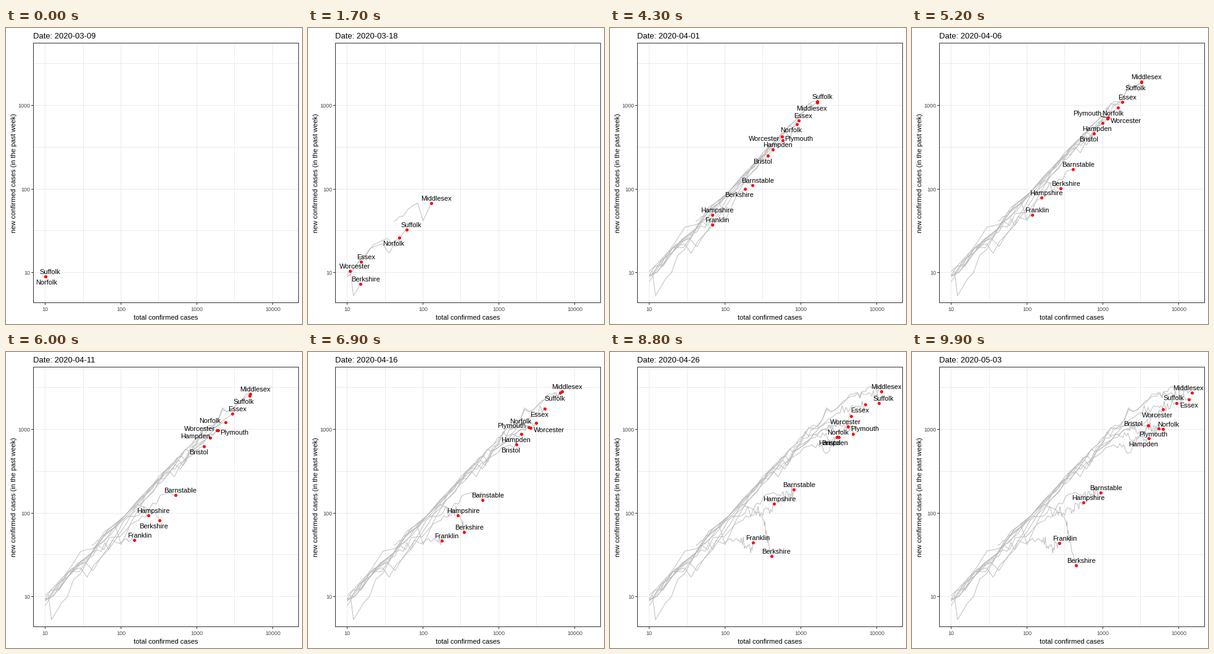
A matplotlib script that plays this animation: 480x480 px, repeating every 10000 ms.

```python
import matplotlib.pyplot as plt
import numpy as np
from matplotlib.animation import FuncAnimation
from matplotlib.patches import Rectangle

SIZE, DPI, FRAMES, LAST_DAY = 480, 80, 100, 55
PT = 72 / DPI
LEFT, TOP, RIGHT, BOTTOM = 44.5, 24.5, 474.5, 445.5
WEEK = 7
# days at which every county has a key point
KEYS = np.array([18.9, 28.9, 33.3, 42.8, 55])

plt.rcParams["font.family"] = "Liberation Sans"
fig = plt.figure(figsize=(SIZE / DPI, SIZE / DPI), dpi=DPI, facecolor="white")
ax = fig.add_axes([0, 0, 1, 1])
ax.set(xlim=(0, SIZE), ylim=(SIZE, 0))
ax.axis("off")


def sx(log_total):
    return 63.6 + 122.85 * (log_total - 1)


def sy(log_new):
    return 396.5 - 135.5 * (log_new - 1)


def crisp(v):
    return np.floor(v) + 0.5


def line(xs, ys, color, z):
    return ax.plot(xs, ys, color=color, lw=PT, zorder=z, snap=False,
                   solid_capstyle="butt")[0]


def text(x, y, s, size, ha="center", color="black", **kw):
    return ax.text(x, y, s, size=size * PT, ha=ha, va="baseline",
                   color=color, zorder=6, **kw)


class County:
    """Total cases ease through three key totals; new cases lag behind them.

    drops: log10(total / new) at the last three key days.
    """

    def __init__(self, name, start, totals, drops, first=10):
        self.start = start
        self.days = np.arange(start, LAST_DAY + 1)
        a, b, c = np.log10(totals)
        late = np.interp(self.days, KEYS,
                         [a, b, b + 0.3 * (c - b), b + 0.65 * (c - b), c])
        u = np.clip((self.days - start) / (KEYS[0] - start), 0, 1)
        a0 = np.log10(first)
        total = np.where(u < 1, a0 + (a - a0) * u ** 1.3, late)

        drop = np.interp(self.days, [start, KEYS[0], *KEYS[2:]],
                         [0.05, 0.08, *drops])
        if start <= WEEK:  # the first reports leave the weekly window
            drop += np.where(self.days > WEEK,
                             0.28 * np.exp((WEEK + 1 - self.days) / 5), 0)
        away = np.abs(self.days[:, None] - KEYS).min(axis=1)
        rng = np.random.default_rng(len(name) + start)
        drop += 0.015 * np.clip(away, 0, 3) * rng.normal(size=self.days.size)

        self.px, self.py = sx(total), sy(total - drop)
        self.half = 2.7 * len(name)
        self.trail = line([], [], "#bebebe", 2)
        self.link = line([], [], "black", 4)
        self.dot, = ax.plot([], [], "o", color="red", ms=5 * PT, mew=0,
                            zorder=5)
        self.label = text(0, 0, name, 11)

    def move(self, day):
        self.x = np.interp(day, self.days, self.px)
        self.y = np.interp(day, self.days, self.py)
        past = self.days < day
        self.trail.set_data(np.r_[self.px[past], self.x],
                            np.r_[self.py[past], self.y])
        self.dot.set_data([self.x], [self.y])

    def spots(self):
        """Places for the label, the best first."""
        side = self.half + 6
        for dx, dy in ((8, -8), (-9, 9), (-side, -3), (side, 3), (-9, -8),
                       (9, 9), (-side - 6, -7), (side + 6, 7)):
            x = np.clip(self.x + dx, LEFT + self.half + 2,
                        RIGHT - self.half - 2)
            yield x, self.y + dy

    def put_label(self, shown, placed):
        def clashes(spot):
            x, y = spot
            dots = sum(abs(c.x - x) < self.half + 2 and abs(c.y - y) < 7
                       for c in shown)
            labels = sum(abs(px - x) < self.half + w and abs(py - y) < 10
                         for px, py, w in placed)
            return dots + 2 * labels

        x, y = min(self.spots(), key=clashes)
        placed.append((x, y, self.half))
        self.label.set_position((x, y + 4))
        ex = np.clip(self.x, x - self.half, x + self.half)
        ey = np.clip(self.y, y - 5, y + 5)
        far = ex != self.x and np.hypot(self.x - ex, self.y - ey) > 6.5
        self.link.set_data([ex, self.x] if far else [],
                           [ey, self.y] if far else [])

    def show(self, on):
        for artist in (self.trail, self.link, self.dot, self.label):
            artist.set_visible(on)


# panel and axes
for v in np.arange(1, 4.1, 0.5):
    line([crisp(sx(v))] * 2, [TOP, BOTTOM], "#ebebeb", 1)
for v in np.arange(1, 3.6, 0.5):
    line([LEFT, RIGHT], [crisp(sy(v))] * 2, "#ebebeb", 1)
for v in range(1, 5):
    x = crisp(sx(v))
    line([x, x], [BOTTOM, 449], "#333333", 1)
    text(x, 459, str(10 ** v), 9, color="#4d4d4d")
for v in range(1, 4):
    y = crisp(sy(v))
    line([41, LEFT], [y, y], "#333333", 1)
    text(39.5, y + 3.5, str(10 ** v), 9, ha="right", color="#4d4d4d")
ax.add_patch(Rectangle((LEFT, TOP), RIGHT - LEFT, BOTTOM - TOP, fill=False,
                       ec="#333333", lw=PT, zorder=7, snap=False))
text(259, 473, "total confirmed cases", 11)
text(16, 235, "new confirmed cases (in the past week)", 11, rotation=90,
     rotation_mode="anchor")
title = text(44, 17, "", 13, ha="left")

counties = [
    County("Middlesex", 1, (845, 3255, 15090), (0.28, 0.44, 0.74), first=41),
    County("Suffolk", 0, (845, 3225, 13745), (0.29, 0.49, 0.78)),
    County("Essex", 9, (478, 1823, 9460), (0.28, 0.45, 0.66), first=14),
    County("Norfolk", 0, (490, 1599, 6260), (0.29, 0.56, 0.79)),
    County("Worcester", 9, (290, 1163, 6260), (0.29, 0.47, 0.56)),
    County("Plymouth", 11, (268, 1185, 5495), (0.28, 0.55, 0.73)),
    County("Hampden", 12, (184, 1001, 4070), (0.27, 0.53, 0.72)),
    County("Bristol", 12, (180, 770, 3995), (0.29, 0.64, 0.55)),
    County("Barnstable", 12, (132, 408, 946), (0.51, 0.62, 0.73)),
    County("Berkshire", 7, (119, 280, 447), (0.59, 0.96, 1.28), first=11),
    County("Hampshire", 15, (30, 157, 559), (0.39, 0.51, 0.62)),
    County("Franklin", 16, (39, 118, 270), (0.51, 0.71, 0.79), first=15),
]


def update(frame):
    day = frame * LAST_DAY / (FRAMES - 1)
    date = np.datetime64("2020-03-09") + frame * LAST_DAY // (FRAMES - 1)
    title.set_text(f"Date: {date}")
    shown = [c for c in counties if day >= c.start]
    for c in counties:
        c.show(c in shown)
    for c in shown:
        c.move(day)
    placed = []
    for c in shown:
        c.put_label(shown, placed)


anim = FuncAnimation(fig, update, frames=FRAMES, init_func=lambda: None,
                     interval=100, repeat=True, repeat_delay=0)
plt.show()
```
